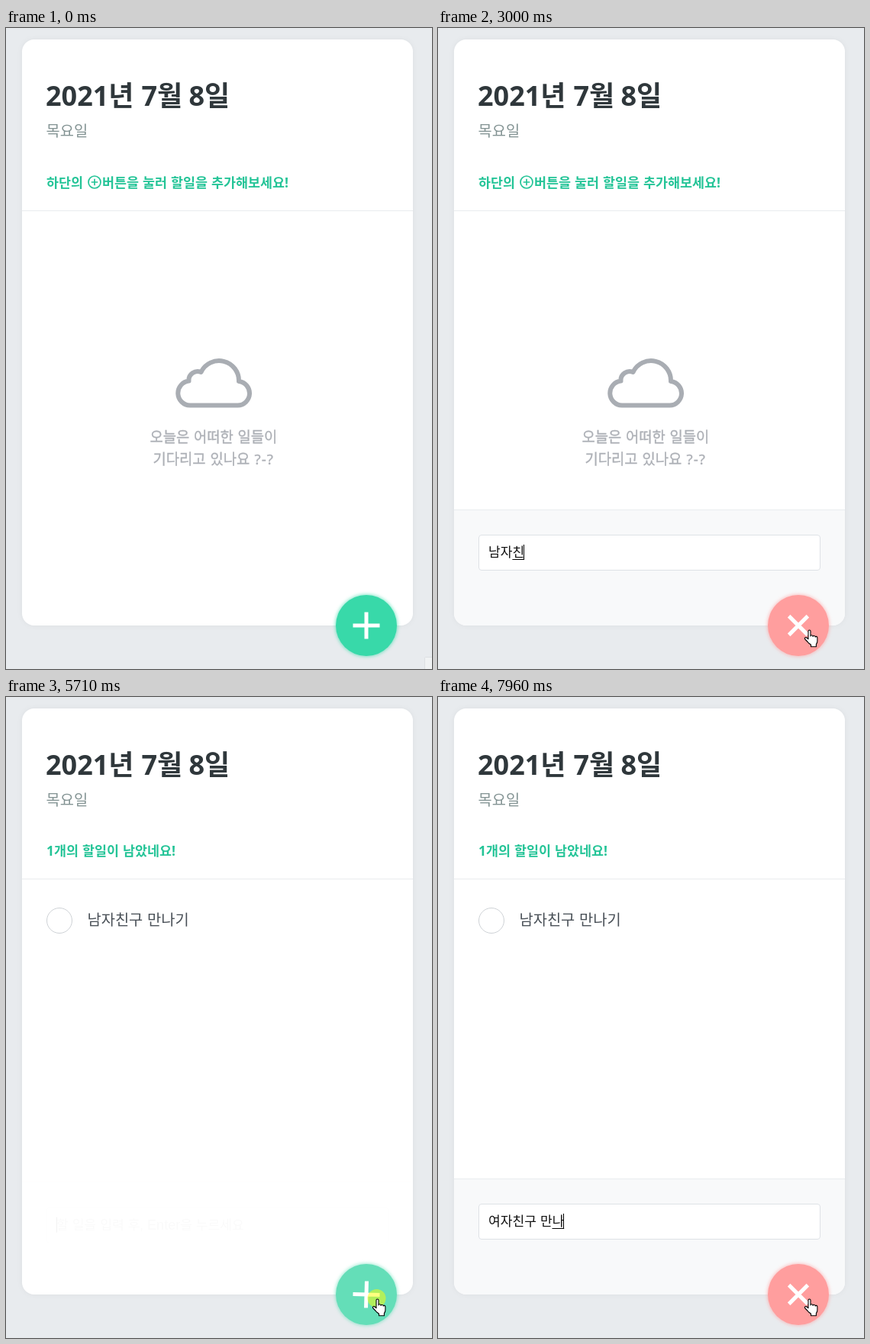
Animation, 558 px wide and 840 px high, one loop 8 s. Source, as an HTML page:

```html
<!DOCTYPE html>
<html lang="ko">
<head>
<meta charset="utf-8">
<title>할 일 목록</title>
<style>
  html, body { margin: 0; width: 100%; height: 100%; overflow: hidden; background: #e8ebee; }
  svg { display: block; width: 558px; height: 840px; }
  text { font-family: 'Noto Sans', 'Noto Sans CJK KR', 'Noto Sans KR', sans-serif; white-space: pre; }
  .card { filter: drop-shadow(0 0 3px rgba(0, 0, 0, .05)); }
  .date { font-size: 36px; font-weight: 700; fill: #2f373b; }
  .day { font-size: 19.8px; fill: #849494; }
  .left { font-size: 17.4px; font-weight: 700; fill: #24c497; word-spacing: .5px; }
  .empty { font-size: 18.8px; fill: #adb0b6; stroke: #adb0b6; stroke-width: .35px; }
  .item { font-size: 19.8px; fill: #495057; }
  .field { font-family: 'Liberation Sans', 'Noto Sans CJK KR', 'Noto Sans KR', sans-serif;
           font-size: 17.1px; word-spacing: .25px; fill: #111; }
  .hint { fill: #a2a2a2; }
</style>
</head>
<body>
<svg viewBox="0 0 558 840">
  <defs>
    <clipPath id="cardClip"><rect x="21" y="15" width="512" height="768" rx="16"/></clipPath>
    <filter id="soft" x="-20%" y="-20%" width="140%" height="140%"><feGaussianBlur stdDeviation="2.2"/></filter>
  </defs>

  <rect class="card" x="21" y="15" width="512" height="768" rx="16" fill="#fff"/>
  <rect id="corner" x="548.5" y="824.5" width="14" height="20" rx="1" fill="#f0f2f3" stroke="#dcdfe2"/>

  <text class="date" y="102"><tspan x="52">2021년</tspan><tspan x="177.5">7월</tspan><tspan x="239.5">8일</tspan></text>
  <text class="day" x="52.5" y="141.5">목요일</text>

  <g id="emptyView">
    <text class="left" y="208.5"><tspan x="53">하단의</tspan><tspan x="126">버튼을 눌러 할일을 추가해보세요!</tspan></text>
    <g fill="none" stroke="#24c497" stroke-width="1.7">
      <circle cx="116" cy="202" r="8"/>
      <path d="M111.7 202h8.6M116 197.700v8.6"/>
    </g>
    <path d="M21 239.500H533" stroke="#e9ecee"/>
    <path d="M241 494.500A16 16 0 0 1 239.500 462.600A11.500 11.500 0 0 1 255.500 451A26 26 0 0 1 305 463A15.800 15.800 0 0 1 303.500 494.500Z"
      fill="none" stroke="#a9adb3" stroke-width="6" stroke-linejoin="round"/>
    <text class="empty" y="542.7"><tspan x="188.500">오늘은</tspan><tspan x="246">어떠한</tspan><tspan x="303.500">일들이</tspan></text>
    <text class="empty" y="571.7"><tspan x="192.500">기다리고</tspan><tspan x="267.500">있나요</tspan><tspan x="325.500" letter-spacing="1">?-?</tspan></text>
  </g>

  <g id="listView">
    <text class="left" x="53" y="207.7">1개의 할일이 남았네요!</text>
    <path d="M21 238.500H533" stroke="#e9ecee"/>
    <g id="item">
      <circle cx="70" cy="293" r="16.500" fill="#fff" stroke="#ced2d6"/>
      <text class="item" y="298.700"><tspan x="106.500">남자친구</tspan><tspan x="185">만나기</tspan></text>
    </g>
  </g>

  <g clip-path="url(#cardClip)">
    <g id="form">
      <rect x="21" y="631" width="512" height="160" fill="#f8f9fa"/>
      <path d="M21 631.500H533" stroke="#e9ecef"/>
      <rect x="53.500" y="664.500" width="447" height="46" rx="3.500" fill="#fff" stroke="#dee2e6"/>
      <text id="hint" class="field hint" x="66" y="693">할 일을 입력 후, <tspan font-size="18">Enter</tspan>을 누르세요</text>
      <text id="typed" class="field" x="66" y="693"></text>
      <rect id="underline" y="696" width="15.700" height="1"/>
      <rect id="caret" y="677" width="1" height="20"/>
    </g>
  </g>

  <circle id="glow" cx="472" cy="783" r="41" opacity=".6" filter="url(#soft)"/>
  <circle id="button" cx="472" cy="783" r="40"/>
  <path id="plus" d="M454.500 783h35M472 765.500v35" stroke="#fff" stroke-width="5"/>
  <circle id="click" cx="485.500" cy="788" r="12" fill="#ff0" opacity=".5"/>

  <g id="pointer" fill="#fff" stroke="#000" stroke-width="1.1" stroke-linejoin="round">
    <path id="arrow" d="M6 1v16l3.700-3.500 2.500 5.700 2.500-1.100-2.500-5.500h5.200z"/>
    <path id="hand" d="M5 12V2.500a1.500 1.500 0 0 1 3 0V9q0-1.500 1.500-1.200q1.600.2 1.600 1.600q.2-1.200 1.700-.9q1.400.3 1.400 1.600q.3-.9 1.400-.7q1.300.3 1.300 1.800v4q0 2.500-1.500 4.500v3H8.500v-2.500L5.500 18Q2.500 14.500.8 13q-1-1.800.4-2.300Q2.800 10.200 5 12.800Z"/>
  </g>
</svg>

<script>
const LOOP = 8000;
const ENTER = 880, HOVER = 1050, OPEN = 1340, SUBMIT = 4335, REOPEN = 5700;
const FADE = 200, TURN = 125, CLICK = 130;
const GREEN = [56, 217, 169], LIGHT = [95, 224, 185], RED = [255, 158, 158];

// Field content by time, including half-composed syllables.
const KEYS = [
  [0, ''], [1880, 'ㄴ'], [1990, '나'], [2160, '남'],
  [2320, '남ㅈ'], [2380, '남자'],
  [2810, '남잧'], [2900, '남자치'], [3000, '남자친'],
  [3170, '남자친ㄱ'], [3230, '남자친구'],
  [3380, '남자친구 '], [3470, '남자친구 ㅁ'], [3560, '남자친구 마'], [3650, '남자친구 만'],
  [3810, '남자친구 만ㄴ'], [3900, '남자친구 만나'], [4010, '남자친구 만낙'], [4110, '남자친구 만나기'],
  [4620, ''], [6320, 'ㅇ'], [6410, '여'], [6520, '옂'], [6650, '여자'],
  [6900, '여잧'], [6980, '여자치'], [7070, '여자친'],
  [7240, '여자친ㄱ'], [7310, '여자친구'], [7410, '여자친구 '], [7510, '여자친구 ㅁ'], [7610, '여자친구 마'],
  [7760, '여자친구 만'], [7860, '여자친구 만ㄴ'], [7960, '여자친구 만나']
];

const $ = id => document.getElementById(id);
const set = (id, attrs) => { for (const k in attrs) $(id).setAttribute(k, attrs[k]); };
const show = (id, on) => { $(id).style.display = on ? '' : 'none'; };
const ramp = (t, start, span) => Math.min(1, Math.max(0, (t - start) / span));
const easeIn = x => x ** 1.4;
const easeOut = x => 1 - (1 - x) ** 2;
const linear = x => x;
const mix = (a, b, p) => a.map((v, i) => v + (b[i] - v) * p);
const within = (t, start, span) => t >= start && t < start + span;

const openness = (t, span, ease) =>
  ease(ramp(t, OPEN, span)) - ease(ramp(t, SUBMIT, span)) + ease(ramp(t, REOPEN, span));

function fadeSlide(id, p) {
  set(id, { opacity: p, transform: `translate(0 ${5 * (1 - p)})` });
}

function drawField(t) {
  const text = KEYS.findLast(([start]) => t >= start)[1];
  const end = 66 + [...text].reduce((w, c) => w + (c === ' ' ? 5 : 15.7), 0);
  const submitted = t >= SUBMIT && t < REOPEN;
  if ($('typed').textContent !== text) $('typed').textContent = text;
  show('hint', !text);
  show('underline', text && !text.endsWith(' ') && !submitted);
  set('underline', { x: end - 15.7 });
  set('caret', { x: text ? Math.round(end) - 1 : 66 });
}

function drawButton(t) {
  const turn = openness(t, TURN, easeIn);
  const idle = mix(GREEN, LIGHT, easeIn(ramp(t, HOVER, TURN)));
  const fill = `rgb(${mix(idle, RED, turn).map(Math.round)})`;
  set('button', { fill });
  set('glow', { fill });
  set('plus', { transform: `rotate(${45 * turn} 472 783)` });
  show('click', within(t, OPEN, CLICK) || within(t, REOPEN, CLICK));
}

function drawPointer(t) {
  const p = easeOut(ramp(t, ENTER, 370));
  show('pointer', t >= ENTER);
  set('pointer', { transform: `translate(${548 - 68 * p} ${832 - 44 * p})` });
  show('arrow', t < HOVER);
  show('hand', t >= HOVER);
}

function draw(t) {
  show('corner', t < ENTER);
  show('emptyView', t < SUBMIT);
  show('listView', t >= SUBMIT);
  fadeSlide('item', ramp(t, SUBMIT, FADE));
  fadeSlide('form', openness(t, FADE, linear));
  drawField(t);
  drawButton(t);
  drawPointer(t);
}

const begin = performance.now();
function tick() {
  draw((performance.now() - begin) % LOOP);
  requestAnimationFrame(tick);
}
tick();
</script>
</body>
</html>
```
